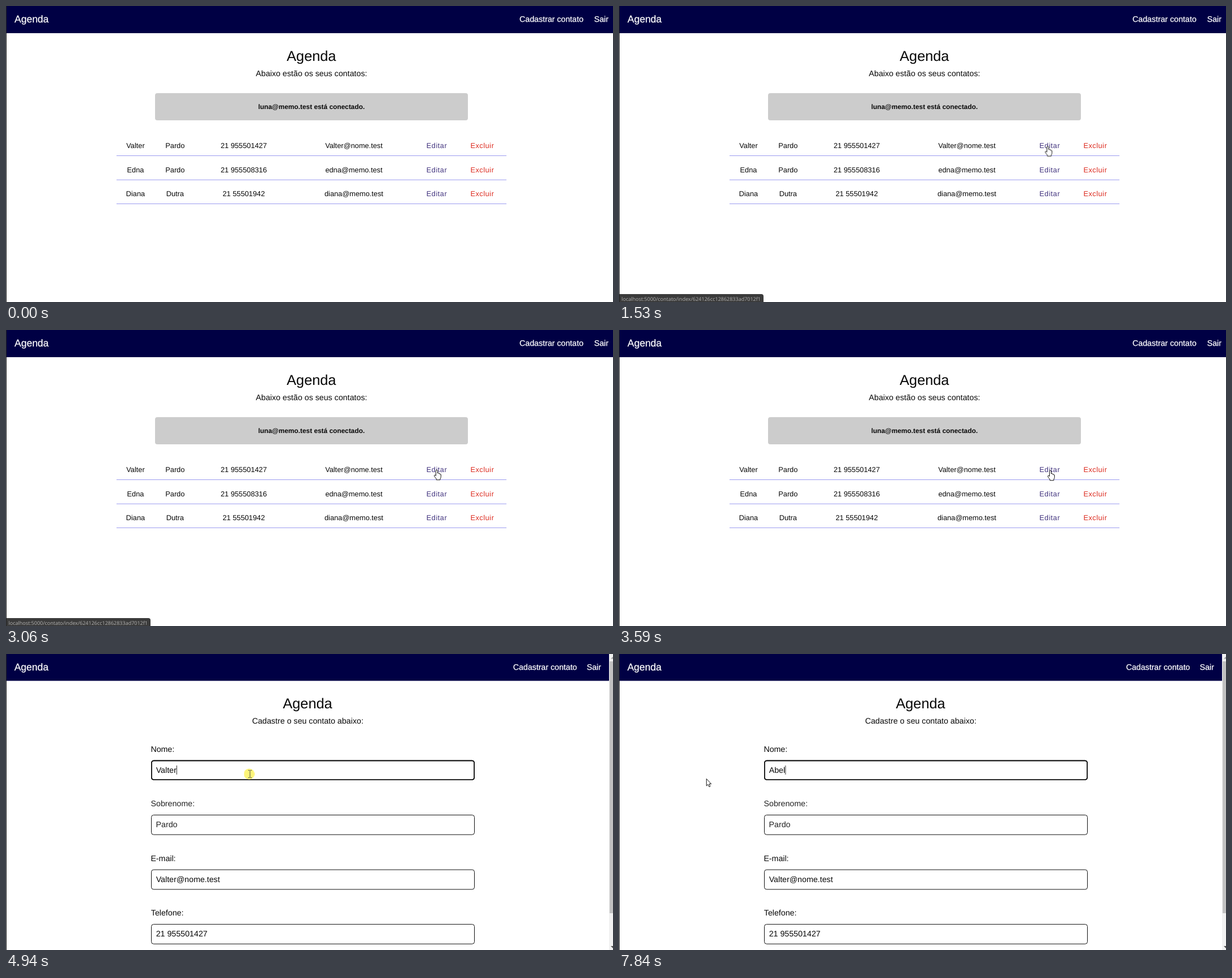
An HTML page for the animation above (8 s loop, 1071x523 px).

```html
<!DOCTYPE html>
<html lang="pt-BR">
<head>
<meta charset="utf-8">
<title>Agenda</title>
<style>
html, body { margin: 0; width: 100%; height: 100%; overflow: hidden; background: #fff; }
svg { display: block; width: 100%; height: 100%; }
text { font: 14.2px "Liberation Sans", Arial, sans-serif; fill: #080808; text-rendering: geometricPrecision; }
.mid, .rows text { text-anchor: middle; }
.brand { font-size: 17.5px; }
.nav rect { fill: #000044; }
.nav text { fill: #fff; stroke: #fff; stroke-width: .25; }
.title { font-size: 25.3px; }
.user { font-size: 11.85px; font-weight: bold; }
.rows text { font-size: 12.75px; }
.rows .edit, .rows .del { letter-spacing: .5px; }
.rows .edit { fill: #43357f; }
.rows .del { fill: #dc281c; }
.rows path { stroke: #9c9cf0; }
.field { fill: #fff; stroke: #111; }
.focus { stroke: #080808; stroke-width: 1.8; }
.url { font: 9px "Open Sans", "Noto Sans", sans-serif; fill: #b4b4b4; }
.soft { fill: #222; }

/* One shared 8 s clock; holds are hard cuts */
.list, .form, .focus, .old, .picked, .new, .typing, .caret, .arrow, .hand, .beam, .press {
  animation: 8s step-end infinite;
}
.list { animation-name: list; }
.form { animation-name: form; }
.focus { animation-name: focus; }
.old { animation-name: old; }
.picked { animation-name: picked; }
.new { animation-name: new; }
.typing { animation-name: typing; }
.caret { animation-name: caret; }
.arrow { animation-name: arrow; }
.hand { animation-name: hand; }
.beam { animation-name: beam; }
.press { animation-name: press; }
.status { animation: status 8s linear infinite; }
.pointer { animation: move 8s step-end infinite; }

@keyframes list { 0% { opacity: 1 } 50.6%, to { opacity: 0 } }
@keyframes form { 0% { opacity: 0 } 50.6%, to { opacity: 1 } }
@keyframes focus { 0% { opacity: 0 } 60.85%, to { opacity: 1 } }
@keyframes old { 0% { opacity: 1 } 63.4%, to { opacity: 0 } }
@keyframes picked { 0% { opacity: 0 } 63.4% { opacity: 1 } 77.95%, to { opacity: 0 } }
@keyframes new { 0% { opacity: 0 } 77.95%, to { opacity: 1 } }
@keyframes caret { 0% { opacity: 0 } 60.85% { opacity: 1 } 63.4% { opacity: 0 } 77.95%, to { opacity: 1 } }
@keyframes typing {
  0% { transform: translateX(36px) }
  77.95% { transform: translateX(0) }
  83.7% { transform: translateX(9.5px) }
  88.83% { transform: translateX(17.4px) }
  94.58% { transform: translateX(25.3px) }
  97.95%, to { transform: translateX(28.5px) }
}
@keyframes arrow {
  0% { opacity: 0 } 5.35% { opacity: 1 } 14.83% { opacity: 0 }
  54.83% { opacity: 1 } 57.45% { opacity: 0 } 65.95%, to { opacity: 1 }
}
@keyframes hand { 0% { opacity: 0 } 14.83% { opacity: 1 } 54.83%, to { opacity: 0 } }
@keyframes beam { 0% { opacity: 0 } 57.45% { opacity: 1 } 65.95%, to { opacity: 0 } }
@keyframes press { 0% { opacity: 0 } 60.85% { opacity: 1 } 65.95%, to { opacity: 0 } }
@keyframes status {
  0%, 14.83% { opacity: 0; animation-timing-function: steps(5) }
  19.1% { opacity: 1 }
  42.25% { opacity: 1; animation-timing-function: steps(3) }
  44.83%, to { opacity: 0 }
}
@keyframes move {
  0% { transform: translate(985px, 427px) }
  5.35% { transform: translate(985px, 427px); animation-timing-function: steps(5) }
  9.75% { transform: translate(850px, 180px); animation-timing-function: steps(6) }
  14.83% { transform: translate(757px, 250px); animation-timing-function: steps(4) }
  19.1% { transform: translate(756.5px, 247.5px) }
  22.45% { transform: translate(761px, 251px); animation-timing-function: steps(2) }
  24.2% { transform: translate(770px, 259px); animation-timing-function: steps(2) }
  25.95% { transform: translate(757px, 239px) }
  26.83% { transform: translate(760px, 248px) }
  28.7% { transform: translate(760px, 249px); animation-timing-function: steps(2) }
  30.33% { transform: translate(760px, 250px); animation-timing-function: steps(3) }
  33.1% { transform: translate(761.5px, 246.5px); animation-timing-function: steps(4) }
  36.2% { transform: translate(758.5px, 250.5px); animation-timing-function: steps(2) }
  38.2% { transform: translate(760px, 247px) }
  38.95% { transform: translate(760.5px, 246.5px) }
  39.83% { transform: translate(761px, 247px) }
  43.1% { transform: translate(761px, 248px) }
  54% { transform: translate(761px, 248px); animation-timing-function: steps(5) }
  58.33% { transform: translate(435.5px, 212px) }
  60.85% { transform: translate(430.5px, 212px) }
  61.75% { transform: translate(430.5px, 212px); animation-timing-function: steps(4) }
  65.1%, to { transform: translate(154px, 220px) }
}
</style>
</head>
<body>
<svg viewBox="0 0 1071 523" preserveAspectRatio="none">
  <g class="list">
    <rect width="1071" height="523" fill="#fff"/>
    <g class="nav">
      <rect width="1071" height="48"/>
      <text class="brand" x="15" y="29">Agenda</text>
      <text x="906" y="28">Cadastrar contato</text>
      <text x="1037.7" y="28">Sair</text>
    </g>
    <text class="title mid" x="538.8" y="96.7">Agenda</text>
    <text class="mid" x="539" y="124">Abaixo estão os seus contatos:</text>
    <rect x="263" y="154" width="552" height="48" rx="4" fill="#ccc"/>
    <text class="user mid" x="539" y="182.2">luna@memo.test está conectado.</text>
    <g class="rows">
      <g>
        <text x="228.5" y="251">Valter</text>
        <text x="298.3" y="251">Pardo</text>
        <text x="419.5" y="251">21 955501427</text>
        <text x="613.8" y="251">Valter@nome.test</text>
        <text class="edit" x="760" y="251">Editar</text>
        <text class="del" x="840.3" y="251">Excluir</text>
        <path d="M195 264.5H883"/>
      </g>
      <g>
        <text x="228.5" y="293.7">Edna</text>
        <text x="298.3" y="293.7">Pardo</text>
        <text x="419.5" y="293.7">21 955508316</text>
        <text x="613.8" y="293.7">edna@memo.test</text>
        <text class="edit" x="760" y="293.7">Editar</text>
        <text class="del" x="840.3" y="293.7">Excluir</text>
        <path d="M195 307.2H883"/>
      </g>
      <g>
        <text x="228.5" y="336">Diana</text>
        <text x="298.3" y="336">Dutra</text>
        <text x="419.5" y="336">21 55501942</text>
        <text x="613.8" y="336">diana@memo.test</text>
        <text class="edit" x="760" y="336">Editar</text>
        <text class="del" x="840.3" y="336">Excluir</text>
        <path d="M195 349.5H883"/>
      </g>
    </g>
    <g class="status">
      <path d="M0 523V509H251Q255 509 255 513V523Z" fill="#3b3b3b"/>
      <text class="url" x="4.5" y="520.5">localhost:5000/contato/index/624126cc12862833ad7012f1</text>
    </g>
  </g>

  <g class="form">
    <rect width="1071" height="523" fill="#fff"/>
    <g class="nav">
      <rect width="1064" height="47.4"/>
      <text class="brand" x="14.7" y="29">Agenda</text>
      <text x="894.7" y="28">Cadastrar contato</text>
      <text x="1024.7" y="28">Sair</text>
    </g>
    <rect x="1064" width="7" height="523" fill="#f1f1f1"/>
    <rect x="1065" y="13" width="6" height="445" fill="#c1c1c1"/>
    <path d="M1067 8.5L1071 4.5V8.5Z" fill="#a3a3a3"/>
    <path d="M1067 516L1071 520V516Z" fill="#505050"/>
    <text class="title mid" x="532" y="95.8">Agenda</text>
    <text class="mid" x="532.4" y="123">Cadastre o seu contato abaixo:</text>

    <text x="255.4" y="173">Nome:</text>
    <rect class="field" x="256.5" y="188" width="570" height="34.5" rx="4"/>
    <rect class="field focus" x="256.9" y="188.6" width="569.2" height="33.5" rx="4"/>
    <text class="old" x="264.7" y="210">Valter</text>
    <g class="picked">
      <rect x="265" y="197" width="36" height="17" fill="#0078d7"/>
      <text x="264.7" y="210" style="fill:#fff">Valter</text>
    </g>
    <text class="new" x="264.7" y="210">Abel</text>
    <g class="caret">
      <g class="typing">
        <rect x="265" y="195" width="40" height="21" fill="#fff"/>
        <rect x="264.7" y="197" width="1" height="16" fill="#222"/>
      </g>
    </g>

    <text class="soft" x="255.6" y="269">Sobrenome:</text>
    <rect class="field" x="256.5" y="284.5" width="570" height="34.7" rx="4"/>
    <text class="soft" x="264.6" y="306">Pardo</text>

    <text x="255.4" y="366">E-mail:</text>
    <rect class="field" x="256.5" y="381.2" width="570" height="34.7" rx="4"/>
    <text x="264.7" y="403">Valter@nome.test</text>

    <text x="255.8" y="462">Telefone:</text>
    <rect class="field" x="256.5" y="477.6" width="570" height="34.7" rx="4"/>
    <text x="264.7" y="499">21 955501427</text>
  </g>

  <rect width="1" height="523" fill="#222"/>

  <g class="pointer" stroke="#111" stroke-width="1" stroke-linejoin="round" fill="#fff">
    <circle class="press" cx="-1.5" r="9.5" fill="#fdf57a" stroke="none"/>
    <path class="arrow" d="M.3 .5V13L3 10.4L5 14.7L7 13.9L5.1 9.6H8.8Z"/>
    <path class="hand" d="M-1.5 1.8Q-1.5 .4 0 .4Q1.5 .4 1.5 1.8V6Q2 5.1 3 5.5Q4 5.8 4 7Q5.7 5.8 5.9 7.8Q7.4 7.2 7.4 9V12.5Q7.4 14 6 16V17.8H-.7V16Q-2.5 14 -4.4 10.9Q-4.6 9.2 -3 9.2Q-2.3 9.4 -1.5 10.5Z"/>
    <path class="beam" fill="none" stroke="#444" d="M-3 -6.5H-.7M.7 -6.5H3M0 -6V6M-3 6.5H-.7M.7 6.5H3"/>
  </g>
</svg>
</body>
</html>
```
